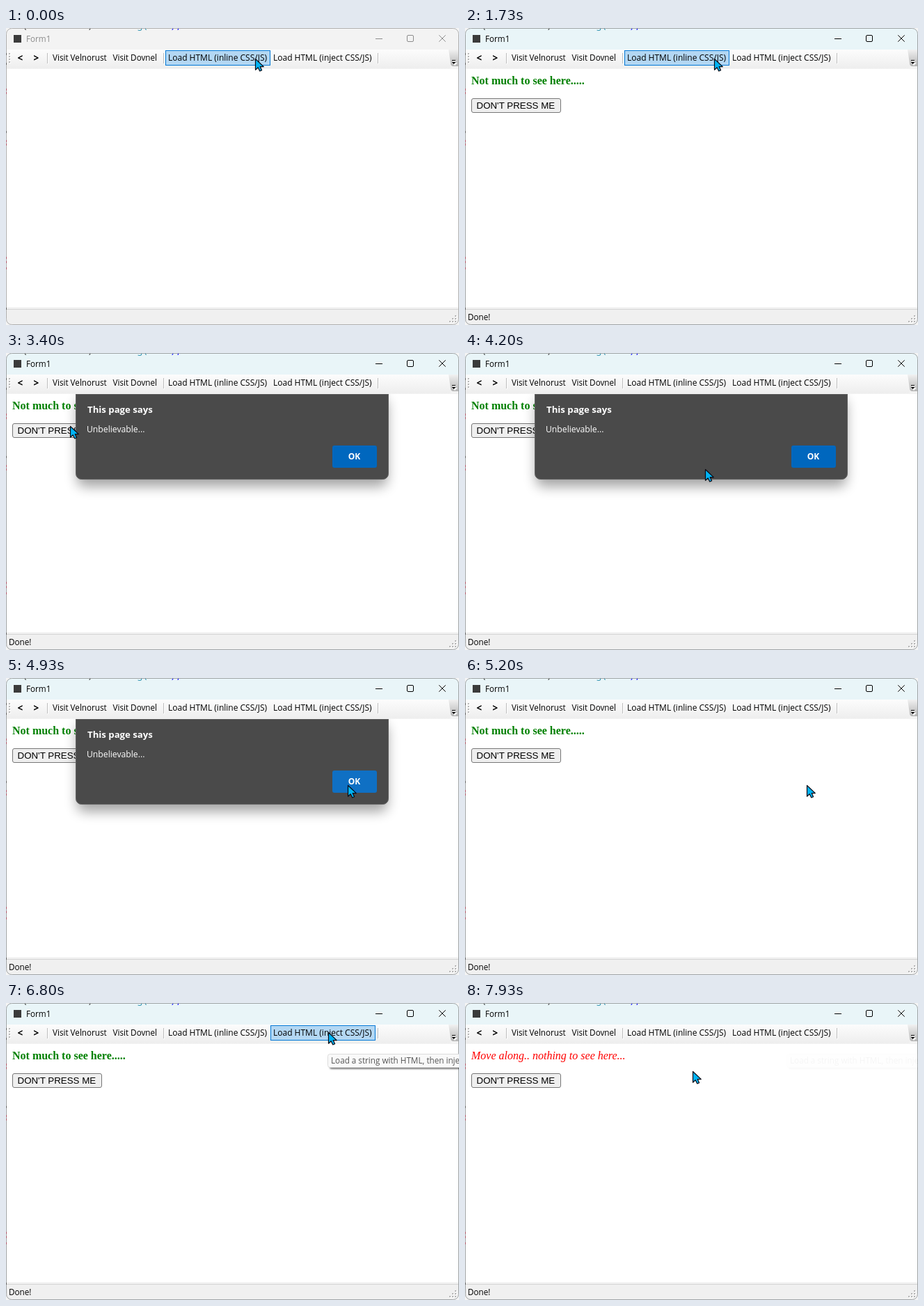
An HTML page that plays this animation: 651x427 px, repeating every 8 s.

```html
<!DOCTYPE html>
<html lang="en">
<head>
<meta charset="utf-8">
<title>Form1</title>
<style>
  html, body { margin: 0; width: 100%; height: 100%; overflow: hidden; background: #fff; }
  svg { display: block; width: 651px; height: 427px; }
  text { white-space: pre; }
  .ui { font: 11.7px "Open Sans", "Noto Sans", sans-serif; }
  .bold { font-weight: 700; }
  .serif { font: 16px "Liberation Serif", serif; }
  .code { font: 13px "Noto Sans Mono", monospace; }
</style>
</head>
<body>
<svg viewBox="0 0 651 427" xmlns="http://www.w3.org/2000/svg">
  <defs>
    <linearGradient id="strip" x2="0" y2="1">
      <stop stop-color="#fcfcfc"/><stop offset="1" stop-color="#eeeeee"/>
    </linearGradient>
    <linearGradient id="more" x2="0" y2="1">
      <stop stop-color="#f1f1f1"/><stop offset="1" stop-color="#b4b4b4"/>
    </linearGradient>
    <filter id="soft" x="-20%" y="-50%" width="140%" height="220%"><feGaussianBlur stdDeviation="9"/></filter>
    <filter id="tipBlur" x="-5%" y="-50%" width="110%" height="200%"><feGaussianBlur stdDeviation="1"/></filter>
    <clipPath id="frame"><rect width="651" height="427" y="0.5" rx="8"/></clipPath>
    <clipPath id="page"><rect x="1" y="59" width="649" height="343"/></clipPath>
  </defs>

  <!-- editor peeking out behind the window -->
  <rect width="651" height="427" fill="#f4f4f4"/>

  <g clip-path="url(#frame)">
    <rect id="title" width="651" height="31"/>
    <g class="code">
      <g clip-path="url(#peek)">
        <text x="0" y="0.5" fill="#333">new(css.builder)</text>
        <text x="134" y="0.5" fill="#2b91af">AsString(</text>
        <text x="236" y="0.5" fill="#0000ff">);</text>
      </g>
    </g>
    <rect y="31" width="651" height="28" fill="#f3f3f3"/>
    <rect x="1" y="31" width="638" height="27" fill="url(#strip)"/>
    <path d="M636 31H650V55H643Q639 55 639 51Z" fill="url(#more)"/>
    <rect x="1" y="59" width="649" height="343" fill="#fff"/>
    <rect y="401.5" width="651" height="26" fill="#f0f0f0"/>
    <path d="M1 404.5H650" stroke="#d5d5d5"/>
  </g>
  <rect x="0.5" y="0.5" width="650" height="426" rx="8" fill="none" id="edge"/>
  <g id="ticks"></g>

  <!-- title bar -->
  <g id="caption">
    <rect x="11" y="10" width="11" height="11" fill="#3b3b3b"/>
    <text class="ui" x="29" y="20" id="name">Form1</text>
    <g id="buttons" fill="none">
      <path d="M531 15.5H541"/>
      <rect x="576.5" y="10.5" width="9" height="9" rx="1.5"/>
      <path d="M622.3 10.3L631.7 19.7M631.7 10.3L622.3 19.7"/>
    </g>
  </g>

  <!-- toolbar -->
  <g id="grip"></g>
  <g id="seps"></g>
  <rect id="inlineBtn" x="229.5" y="32.5" width="150" height="21" stroke="#0078d7"/>
  <rect id="injectBtn" x="380.5" y="32.5" width="150" height="21" stroke="#0078d7"/>
  <g class="ui">
    <text class="bold" x="16.5" y="47.5" font-size="13.5">&lt;</text>
    <text class="bold" x="39.5" y="47.5" font-size="13.5">&gt;</text>
    <text x="67" y="47">Visit Velnorust</text>
    <text x="153.5" y="47">Visit Dovnel</text>
    <text x="233" y="47" font-size="12">Load HTML (inline CSS/JS)</text>
    <text x="384" y="47" font-size="12">Load HTML (inject CSS/JS)</text>
  </g>
  <path d="M642 47.5H647M642 50.5H648L645 53.5Z" stroke="#fff" fill="#fff"/>
  <path d="M641 46.5H646" stroke="#000"/>
  <path d="M640.8 49H646.2L643.5 52Z" fill="#000"/>

  <!-- page -->
  <g id="content">
    <text class="serif" id="green" x="9" y="81" fill="#008000" font-weight="700" style="font-weight:700">Not much to see here.....</text>
    <text class="serif" id="red" x="9" y="81" fill="#ff0000" style="font-style:italic">Move along.. nothing to see here...</text>
    <rect id="press" x="9.5" y="101.5" width="128" height="20" rx="2.5"/>
    <text x="16.5" y="116" font-family="Liberation Sans, sans-serif" font-size="13.333">DON'T PRESS ME</text>
  </g>

  <!-- dialog -->
  <g id="dialog" clip-path="url(#page)">
    <rect x="102" y="66" width="446" height="126" rx="10" fill="#000" opacity="0.36" filter="url(#soft)"/>
    <rect x="100.5" y="50.5" width="449" height="131" rx="8" fill="#4a4a4a" stroke="#636363"/>
    <path d="M101 59.5H549" stroke="#5a5a5a"/>
    <g class="ui" fill="#fff">
      <text class="bold" x="117" y="86" font-size="13.2">This page says</text>
      <text x="116" y="114" font-size="12.2">Unbelievable...</text>
      <rect id="ok" x="469" y="133" width="64" height="32" rx="3"/>
      <text class="bold" x="500.5" y="153" font-size="12" text-anchor="middle">OK</text>
    </g>
  </g>

  <!-- status bar -->
  <text class="ui" id="status" x="4" y="420" font-size="12">Done!</text>
  <g id="sizer"></g>

  <!-- tooltip -->
  <g id="tip">
    <rect x="465" y="76" width="260" height="19" rx="3" fill="#000" opacity="0.5" filter="url(#tipBlur)"/>
    <rect x="462.5" y="73.5" width="260" height="19" rx="3" fill="#f9f9f9" stroke="#dcdcdc"/>
    <text class="ui" x="467" y="87" font-size="11.6" fill="#575757">Load a string with HTML, then inject CSS/JS</text>
  </g>

  <path id="cursor" d="M0.5 0.5V16.2L4.2 12.8L6.7 18L9.6 16.7L7.2 11.6H12.3Z"
        fill="#00b4f5" stroke="#0a0a14" stroke-width="1.2" stroke-linejoin="round"/>
</svg>

<script>
const $ = id => document.getElementById(id);
const LOOP = 8000, FPS = 15;

// pointer stops: step, x, y
const path = [
  [0, 358, 44], [36, 358, 44], [44, 92, 105], [57, 92, 105],
  [63, 345, 167], [66, 438, 182], [70, 490, 156], [71, 491, 154],
  [81, 491, 154], [89, 465, 52], [90, 465, 52], [91, 464, 46],
  [92, 463, 42], [113, 463, 42], [119, 327, 98], [120, 327, 98]
];

function slope(i, axis) {
  const a = path[i - 1], b = path[i], c = path[i + 1];
  if (!a || !c || a[axis] === b[axis] || b[axis] === c[axis]) return 0;
  return (c[axis] - a[axis]) / (c[0] - a[0]);
}

function pointer(step) {
  let i = 0;
  while (i < path.length - 2 && path[i + 1][0] <= step) i++;
  const a = path[i], b = path[i + 1], span = b[0] - a[0];
  const u = (step - a[0]) / span, v = 1 - u;
  const at = axis =>
    a[axis] * (1 + 2 * u) * v * v + b[axis] * (3 - 2 * u) * u * u +
    span * u * v * (slope(i, axis) * v - slope(i + 1, axis) * u);
  return [Math.round(at(1)), Math.round(at(2))];
}

const clamp = v => Math.max(0, Math.min(1, v));
const between = (v, a, b) => v >= a && v < b;
const set = (id, attrs) => {
  for (const key in attrs) $(id).setAttribute(key, attrs[key]);
};
const show = (id, on) => $(id).setAttribute("visibility", on ? "visible" : "hidden");
const mix = (a, b, u) => `rgb(${a.map((v, i) => Math.round(v + (b[i] - v) * u))})`;
const box = (x, y, w, h, fill) => `<rect x="${x}" y="${y}" width="${w}" height="${h}" fill="${fill}"/>`;

function buildDetails() {
  let grip = "", seps = "", sizer = "", ticks = "";
  for (let y = 36; y < 50; y += 4) {
    grip += box(5, y + 1, 2, 2, "#fff") + box(4, y, 2, 2, "#b8b8b8");
  }
  for (const x of [59, 226, 534]) {
    seps += box(x, 36, 1, 15, "#bdbdbd") + box(x + 1, 37, 1, 15, "#fff");
  }
  for (let row = 0; row < 3; row++) {
    for (let col = 0; col <= row; col++) {
      const x = 645 - col * 4, y = 413 + row * 4;
      sizer += box(x + 1, y + 1, 2, 2, "#fff") + box(x, y, 2, 2, "#b5b5b5");
    }
  }
  for (const y of [87, 92, 161, 166, 329, 335, 344]) ticks += box(0, y, 1, 3, "#b0586a");
  for (const y of [36, 50, 148, 402]) ticks += box(0, y, 1, 3, "#666");
  $("grip").innerHTML = grip;
  $("seps").innerHTML = seps;
  $("sizer").innerHTML = sizer;
  $("ticks").innerHTML = ticks;
}

function toolButton(id, hover, down) {
  show(id, hover);
  set(id, { fill: down ? "#80bceb" : "#b3d7f3" });
}

function draw(ms) {
  const step = Math.floor((ms % LOOP) * FPS / 1000 + 0.1);
  const [x, y] = pointer(step);
  const over = (x0, y0, x1, y1) => between(x, x0, x1) && between(y, y0, y1);

  const active = clamp((step - 9) / 5);
  const ink = mix([140, 140, 140], [0, 0, 0], active);
  set("title", { fill: mix([243, 243, 243], [233, 245, 248], active) });
  set("edge", { stroke: mix([176, 176, 176], [160, 164, 166], active) });
  set("name", { fill: ink });
  set("buttons", { stroke: ink });

  toolButton("inlineBtn", over(229, 32, 380, 54), between(step, 23, 26));
  toolButton("injectBtn", over(380, 32, 531, 54), between(step, 99, 102));

  const injected = step >= 104;
  show("content", step >= 26);
  $("green").style.display = injected ? "none" : "";
  $("red").style.display = injected ? "" : "none";
  show("status", step >= 26 && step !== 103);

  const dialog = between(step, 51, 78);
  const pressed = between(step, 49, 51);
  const hover = !dialog && over(9, 101, 138, 122);
  set("press", {
    fill: pressed ? "#f5f5f5" : hover ? "#e5e5e5" : "#efefef",
    stroke: pressed ? "#8d8d8d" : hover ? "#4f4f4f" : "#767676"
  });

  show("dialog", dialog);
  const okDown = between(step, 73, 74);
  set("ok", { fill: okDown ? "#1a5c9c" : over(469, 133, 533, 165) ? "#0f70c4" : "#0067be" });

  const fade = step < 114 ? clamp((step - 93) / 4) : clamp(1 - (step - 114) * 0.19);
  set("tip", { opacity: fade });
  set("cursor", { transform: `translate(${x} ${y})` });
}

function tick() {
  draw(performance.now());
  requestAnimationFrame(tick);
}

buildDetails();
tick();
</script>
</body>
</html>
```
